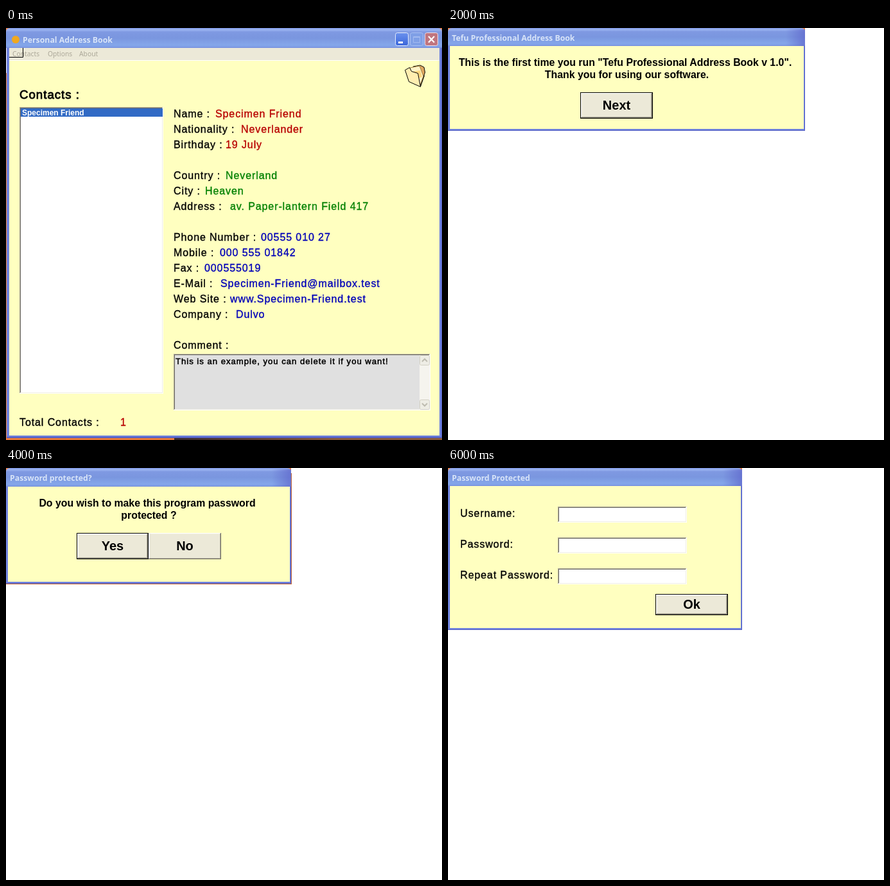
These frames come from a looping animation (679 by 641 pixels, 8 s). An HTML page:

```html
<!DOCTYPE html>
<html lang="en">
<head>
<meta charset="utf-8">
<title>Address book</title>
<style>
html, body { margin: 0; width: 100%; height: 100%; overflow: hidden; background: #fff; }
svg { display: block; width: 679px; height: 641px; }
text { font-family: "Liberation Sans", Arial, sans-serif; white-space: pre; }
.label { font-size: 16px; letter-spacing: .9px; stroke-width: .35px; }
.head { font-size: 18.67px; letter-spacing: 1px; stroke-width: .8px; }
.note { font-size: 13.1px; letter-spacing: 1px; stroke-width: .5px; }
.bold { font-size: 15.85px; font-weight: 700; }
.button { font-size: 20px; font-weight: 700; text-anchor: middle; }
.row { font-size: 12px; font-weight: 700; }
.caption { font: 700 12.3px "Open Sans", "Noto Sans", sans-serif; }
.menu { font: 10.3px "Noto Sans", "Open Sans", sans-serif; }
.mid { text-anchor: middle; }
.scene { visibility: hidden; animation: show 8s step-end infinite; }
@keyframes show {
  0% { visibility: visible; }
  25%, 100% { visibility: hidden; }
}
</style>
</head>
<body>
<svg id="stage" viewBox="0 0 679 641" xmlns="http://www.w3.org/2000/svg"></svg>
<script>
const CREAM = '#ffffc0', FACE = '#ece9d8', ORANGE = '#e8793a', BLUE = '#6f83de', DEEP = '#5560c4';
const RED = '#b80000', GREEN = '#008000', NAVY = '#0000b8';

const rect = (x, y, w, h, fill, extra = '') =>
  `<rect x="${x}" y="${y}" width="${w}" height="${h}" fill="${fill}" ${extra}/>`;
const path = (d, fill, stroke = 'none', width = 1) =>
  `<path d="${d}" fill="${fill}" stroke="${stroke}" stroke-width="${width}"/>`;
const text = (x, y, str, cls, color = '#000') => {
  const stroke = /label|head|note/.test(cls) ? color : 'none';
  return `<text x="${x}" y="${y}" class="${cls}" fill="${color}" stroke="${stroke}">${str}</text>`;
};

// Two nested edges: light and dark sides of a box
function bevel(x, y, w, h, [tl, br, tl2, br2], fill) {
  return rect(x, y, w, h, br) + rect(x, y, w - 1, h - 1, tl) +
    rect(x + 1, y + 1, w - 2, h - 2, br2) + rect(x + 1, y + 1, w - 3, h - 3, tl2) +
    rect(x + 2, y + 2, w - 4, h - 4, fill);
}
const sunken = (x, y, w, h, fill = '#fff') =>
  bevel(x, y, w, h, ['#aca899', '#fff', '#716f64', '#f1efe2'], fill);

function button(x, y, w, h, str, base, active = true) {
  const edges = ['#fff', '#716f64', '#f1efe2', '#aca899'];
  const box = active
    ? rect(x, y, w, h, '#000') + bevel(x + 1, y + 1, w - 2, h - 2, edges, FACE)
    : bevel(x, y, w, h, edges, FACE);
  return box + text(x + w / 2, base, str, 'button');
}

function titleBar(w, h) {
  return rect(0, 0, 9, 8, ORANGE) + rect(w - 9, 0, 9, 8, ORANGE) +
    path(`M0 ${h}V6Q0 0 6 0H${w - 6}Q${w} 0 ${w} 6V${h}Z`, 'url(#bar)');
}

function dialog(w, h, bar, title) {
  return titleBar(w, bar) +
    rect(w - 30, 2, 30, bar - 2, 'url(#shade)') +
    rect(0, bar, w, h - bar, BLUE) +
    rect(w - 1, bar, 1, h - bar, DEEP) + rect(0, h - 1, w, 1, DEEP) +
    rect(3, bar, w - 5, h - bar - 3, CREAM) +
    text(6, 20, title, 'caption', '#d8e4f8');
}

function windowButtons() {
  const box = (x, fill, edge) => rect(x + .5, 7.5, 20, 20, fill, `rx="3" stroke="${edge}"`);
  return box(606, 'url(#min)', '#e4ecfc') + rect(611, 21, 7, 3, '#fff') +
    box(629, '#7f9fe6', '#a9c0f2') +
    path('M634.5 13.5h10v9h-10zM634.5 14.5h10', 'none', '#a3baf0') +
    box(652, '#c0757f', '#eedfe8') +
    path('M658 13l9 9.500M667 13l-9 9.500', 'none', '#fff', 2.2);
}

function folder() {
  return path('M634 60l11-2 6 3 1.500 8-7 21-6-12z', '#e0a860', '#000') +
    path('M629 62l15-3 6 16-5 14-12-8z', '#fff4c8', '#a08040') +
    path('M632 68l13-2 3 10-10 4z', '#ffd880') +
    path('M621.500 65.500l7-4 3 6 10 3 4 21-18-8z', '#ffeeb0', '#000') +
    path('M645.500 91l6-17', 'none', '#000');
}

function scrollBar(x, y, h) {
  const knob = (ky, d) =>
    rect(x + .5, ky + .5, 15, 15, '#eeede5', 'rx="2" stroke="#d2d0c4"') +
    path(`M${x + 4} ${ky + 8 + d * 2}l4 ${-4 * d} 4 ${4 * d}`, 'none', '#bebcb0', 2);
  return rect(x, y, 16, h, '#f5f4ee') + knob(y, 1) + knob(y + h - 16, -1);
}

// line number, label, value x, value, colour
const fields = [
  [0, 'Name :', 326, 'Specimen Friend', RED],
  [1, 'Nationality :', 366, 'Neverlander', RED],
  [2, 'Birthday :', 342, '19 July', RED],
  [4, 'Country :', 342, 'Neverland', GREEN],
  [5, 'City :', 310, 'Heaven', GREEN],
  [6, 'Address :', 349, 'av. Paper-lantern Field 417', GREEN],
  [8, 'Phone Number :', 397, '00555 010 27', NAVY],
  [9, 'Mobile :', 333, '000 555 01842', NAVY],
  [10, 'Fax :', 309, '000555019', NAVY],
  [11, 'E-Mail :', 334, 'Specimen-Friend@mailbox.test', NAVY],
  [12, 'Web Site :', 349, 'www.Specimen-Friend.test', NAVY],
  [13, 'Company :', 358, 'Dulvo', NAVY],
  [15, 'Comment :', 0, '', NAVY]
];

function mainWindow() {
  const rows = fields.map(([n, label, x, value, color]) => {
    const y = 139 + n * 24;
    return text(261, y, label, 'label') + (value && text(x, y, value, 'label', color));
  }).join('');
  return titleBar(679, 31) +
    rect(0, 31, 679, 607, BLUE) + rect(0, 31, 1, 39, '#f0eef4') + rect(0, 70, 1, 571, ORANGE) +
    rect(678, 31, 1, 607, DEEP) + rect(1, 636, 678, 2, DEEP) +
    rect(0, 638, 262, 3, ORANGE) + rect(262, 638, 417, 3, 'url(#floor)') +
    rect(5, 31, 670, 20, FACE) + rect(5, 50, 670, 1, '#fff') +
    rect(5, 51, 670, 583, CREAM) +
    '<circle cx="15" cy="18" r="6" fill="#f0a820"/>' +
    text(26, 23, 'Personal Address Book', 'caption', '#d8e4f8') + windowButtons() +
    text(10, 44, 'Contacts', 'menu', '#aca899') +
    text(65, 44, 'Options', 'menu', '#aca899') +
    text(114, 44, 'About', 'menu', '#aca899') +
    path('M5 45.500H26.500V31', 'none', '#000') + folder() +
    text(21, 110, 'Contacts :', 'head') +
    sunken(21, 123, 224, 446) + rect(23, 125, 221, 13, '#316ac5') +
    text(25, 136, 'Specimen Friend', 'row', '#fff') + rows +
    sunken(261, 507, 400, 88, '#e0e0e0') + scrollBar(644, 509, 85) +
    text(264, 523, 'This is an example, you can delete it if you want!', 'note') +
    text(21, 619, 'Total Contacts :', 'label') + text(178, 619, '1', 'label', RED);
}

function welcome() {
  return dialog(556, 160, 28, 'Tefu Professional Address Book') +
    text(276, 59, 'This is the first time you run "Tefu Professional Address Book v 1.0".', 'bold mid') +
    text(278.5, 78, 'Thank you for using our software.', 'bold mid') +
    button(206, 100, 113, 41, 'Next', 127);
}

function question() {
  return rect(0, 8, 445, 173, '#c4683c') +
    dialog(444, 180, 29, 'Password protected?') +
    text(220, 60, 'Do you wish to make this program password', 'bold mid') +
    text(222.5, 79, 'protected ?', 'bold mid') +
    button(110, 101, 112, 41, 'Yes', 128) + button(222, 101, 113, 41, 'No', 128, false);
}

function login() {
  const lines = ['Username:', 'Password:', 'Repeat Password:'].map((label, i) =>
    text(19, 76 + i * 48, label, 'label') + sunken(171, 60 + i * 48, 201, 25)).join('');
  return dialog(458, 252, 28, 'Password Protected') + lines +
    button(323, 196, 113, 33, 'Ok', 219);
}

const gradient = (id, dir, stops) =>
  `<linearGradient id="${id}" ${dir}>` + stops.map(([at, color, a = 1]) =>
    `<stop offset="${at}" stop-color="${color}" stop-opacity="${a}"/>`).join('') + '</linearGradient>';
const down = 'x2="0" y2="1"';
const defs = '<defs>' +
  gradient('bar', down, [[0, '#7a92e0'], [.08, '#9db6f2'], [.2, '#7f99e2'], [.5, '#7a96df'],
    [.85, '#84a6ea'], [.95, '#7f9ee6'], [1, '#6f86d8']]) +
  gradient('shade', '', [[0, '#5f68cc', 0], [1, '#5f68cc', .75]]) +
  gradient('floor', '', [[0, '#38282c'], [.6, '#8a5a3c']]) +
  gradient('min', down, [[0, '#6c92ee'], [1, '#3a66da']]) + '</defs>';

document.getElementById('stage').innerHTML = defs +
  [mainWindow, welcome, question, login].map((draw, i) =>
    `<g class="scene" style="animation-delay:${i && 2 * i - 8}s">${draw()}</g>`).join('');
</script>
</body>
</html>
```
